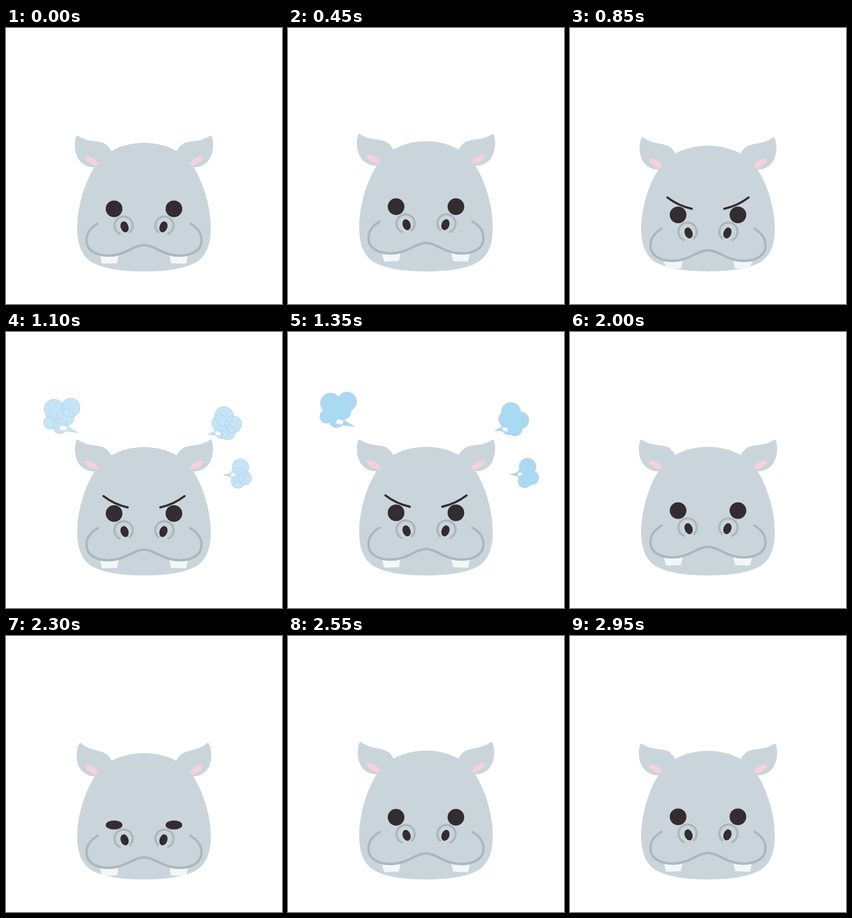
These frames come from a looping animation (500x500 px, 3 s). An HTML page with a canvas:

```html
<!DOCTYPE html>
<html lang="en">
<head>
<meta charset="utf-8">
<title>Hippo</title>
<style>
html, body { margin: 0; width: 100%; height: 100%; overflow: hidden; background: #fff; }
canvas { display: block; width: 500px; height: 500px; }
</style>
</head>
<body>
<canvas id="stage" width="500" height="500"></canvas>
<script>
const ctx = document.getElementById('stage').getContext('2d');
const LOOP = 3000, STEP = 50, BASE = 441;
const SKIN = '#cad5db', LINE = '#acb7bd', DARK = '#332c31', PINK = '#f6d0df', TOOTH = '#f3f7fa';
const SKY = '#a9d9f3', SKY_EDGE = '#bccfd9';

// Each cloud: drift per puff, tip of the tail, and lobes as [x, y, radius].
const CLOUDS = [
  { drift: [-11, -12], tip: [119, 171], lobes: [[107, 126, 17], [77, 129, 18], [70, 153, 12], [88, 160, 13], [98, 143, 16]] },
  { drift: [10, -8], tip: [376, 178], lobes: [[404, 145, 17], [421, 160, 15], [411, 175, 13], [400, 174, 12], [397, 158, 15]] },
  { drift: [10, -1], tip: [404, 258], lobes: [[434, 244, 15], [442, 264, 12], [429, 270, 12], [429, 258, 13]] }
];

const head = new Path2D('M250 208 C285 208 322 222 341 254 C361 287 371 330 371 362 C371 394 362 413 345 424 C322 437 288 441 250 441 C212 441 178 437 155 424 C138 413 129 394 129 362 C129 330 139 287 159 254 C178 222 215 208 250 208 Z');
const ear = new Path2D('M130 195 C144 205 160 204 172 207 C181 209 187 216 191 223 L186 250 L160 252 C150 253 140 248 134 241 C124 229 123 208 127 197 Q128 194 130 195 Z');
const earPink = oval(155, 240.5, 13.5, 5.3, 0.5);
const tooth = new Path2D('M170 411 L204 411 L201 426 Q188 427 174 427 Z');
const lip = new Path2D('M166 354.5 C151 363 145 375 146 387 C147 405 168 413 187 412.3 C216 412 231 393.2 250 393.2');
const brow = new Path2D('M176.5 296 Q196 311 220.5 316.5');
const eye = oval(0, 0, 15.1, 15.1);
const nostril = oval(214.8, 360.3, 7.1, 10.2, -0.33);
const nostrilRing = new Path2D();
nostrilRing.arc(213, 358, 16.5, 2, 7.1);

// Smooth bump: 1 at mid, 0 beyond mid ± half.
function bell(t, mid, half) {
  const d = Math.min(1, Math.abs(t - mid) / half);
  return (1 + Math.cos(Math.PI * d)) / 2;
}

// Fades in from a to b and out from c to d.
function fade(t, a, b, c, d) {
  return Math.max(0, Math.min(1, (t - a) / (b - a), (d - t) / (d - c)));
}

function pose(t) {
  const rise = bell(t, 480, 320), frown = bell(t, 850, 320);
  const rise2 = bell(t, 1990, 280), blink = bell(t, 2310, 300);
  return {
    face: 11 * frown + 9 * blink - 4 * (rise + rise2),
    top: 5 * frown + 4 * blink - 3 * rise - bell(t, 2560, 160),
    ear: 0.045 * frown + 0.14 * bell(t, 2380, 300) - 0.06 * bell(t, 220, 200),
    lid: 1 - 0.46 * bell(t, 2310, 200),
    anger: fade(t, 600, 780, 1650, 1800),
    puff: fade(t, 1040, 1130, 1600, 1700)
  };
}

function oval(x, y, rx, ry, turn = 0) {
  const p = new Path2D();
  p.ellipse(x, y, rx, ry, turn, 0, Math.PI * 2);
  return p;
}

function fill(path, color) {
  ctx.fillStyle = color;
  ctx.fill(path);
}

function stroke(path, color, width) {
  ctx.strokeStyle = color;
  ctx.lineWidth = width;
  ctx.stroke(path);
}

function scoped(draw) {
  ctx.save();
  draw();
  ctx.restore();
}

function bothSides(draw) {
  scoped(draw);
  scoped(() => {
    ctx.translate(500, 0);
    ctx.scale(-1, 1);
    draw();
  });
}

function cloudPath({ tip: [tx, ty], lobes }) {
  const p = new Path2D();
  for (const [x, y, r] of lobes) p.addPath(oval(x, y, r, r));
  // The tail starts at the lobe nearest to its tip.
  const gap = ([x, y]) => Math.hypot(x - tx, y - ty);
  const [x, y] = lobes.reduce((a, b) => gap(b) < gap(a) ? b : a);
  const a = Math.atan2(ty - y, tx - x), w = 7;
  const tail = new Path2D();
  tail.moveTo(x - w * Math.sin(a), y + w * Math.cos(a));
  tail.lineTo(tx, ty);
  tail.lineTo(x + w * Math.sin(a), y - w * Math.cos(a));
  tail.closePath();
  p.addPath(tail);
  return p;
}

const puffs = CLOUDS.map(c => ({ drift: c.drift, path: cloudPath(c) }));

function drawClouds(t, alpha) {
  const k = (t - 1350) / 275;
  for (const { drift: [dx, dy], path } of puffs) scoped(() => {
    ctx.globalAlpha = alpha;
    ctx.translate(dx * k, dy * k);
    stroke(path, SKY_EDGE, 1.5);
    // One-sided fills keep overlapping lobes seamless.
    fill(path, SKY);
  });
}

function drawEar(top, turn) {
  ctx.translate(175, 240 + top);
  ctx.rotate(turn);
  ctx.translate(-175, -240);
  fill(ear, SKIN);
  fill(earPink, PINK);
}

function drawMouth(dy) {
  ctx.translate(0, dy > 0 ? dy * 0.86 : dy);
  bothSides(() => {
    fill(tooth, TOOTH);
    stroke(lip, LINE, 4.3);
  });
}

function drawFeatures({ face, lid, anger }) {
  ctx.translate(0, face);
  bothSides(() => {
    stroke(nostrilRing, LINE, 4);
    fill(nostril, DARK);
    scoped(() => {
      ctx.translate(195.8, 327.5 + (1 - lid) * 13);
      ctx.scale(1, lid);
      fill(eye, DARK);
    });
    ctx.globalAlpha = anger;
    stroke(brow, DARK, 4);
  });
}

function draw(t) {
  const p = pose(t);
  ctx.fillStyle = '#fff';
  ctx.fillRect(0, 0, 500, 500);
  ctx.lineCap = 'round';
  drawClouds(t, p.puff);

  // The head squashes while its base stays in place.
  const sy = 1 - p.top / 233;
  const skull = new Path2D();
  skull.addPath(head, new DOMMatrix([1, 0, 0, sy, 0, BASE * (1 - sy)]));
  fill(skull, SKIN);
  bothSides(() => drawEar(p.top, p.ear));

  scoped(() => {
    ctx.clip(skull);
    scoped(() => drawMouth(p.face));
    drawFeatures(p);
  });
}

const start = performance.now();
function frame(now) {
  const t = Math.max(0, now - start) % LOOP;
  draw(Math.floor(t / STEP) * STEP);
  requestAnimationFrame(frame);
}
draw(0);
requestAnimationFrame(frame);
</script>
</body>
</html>
```
